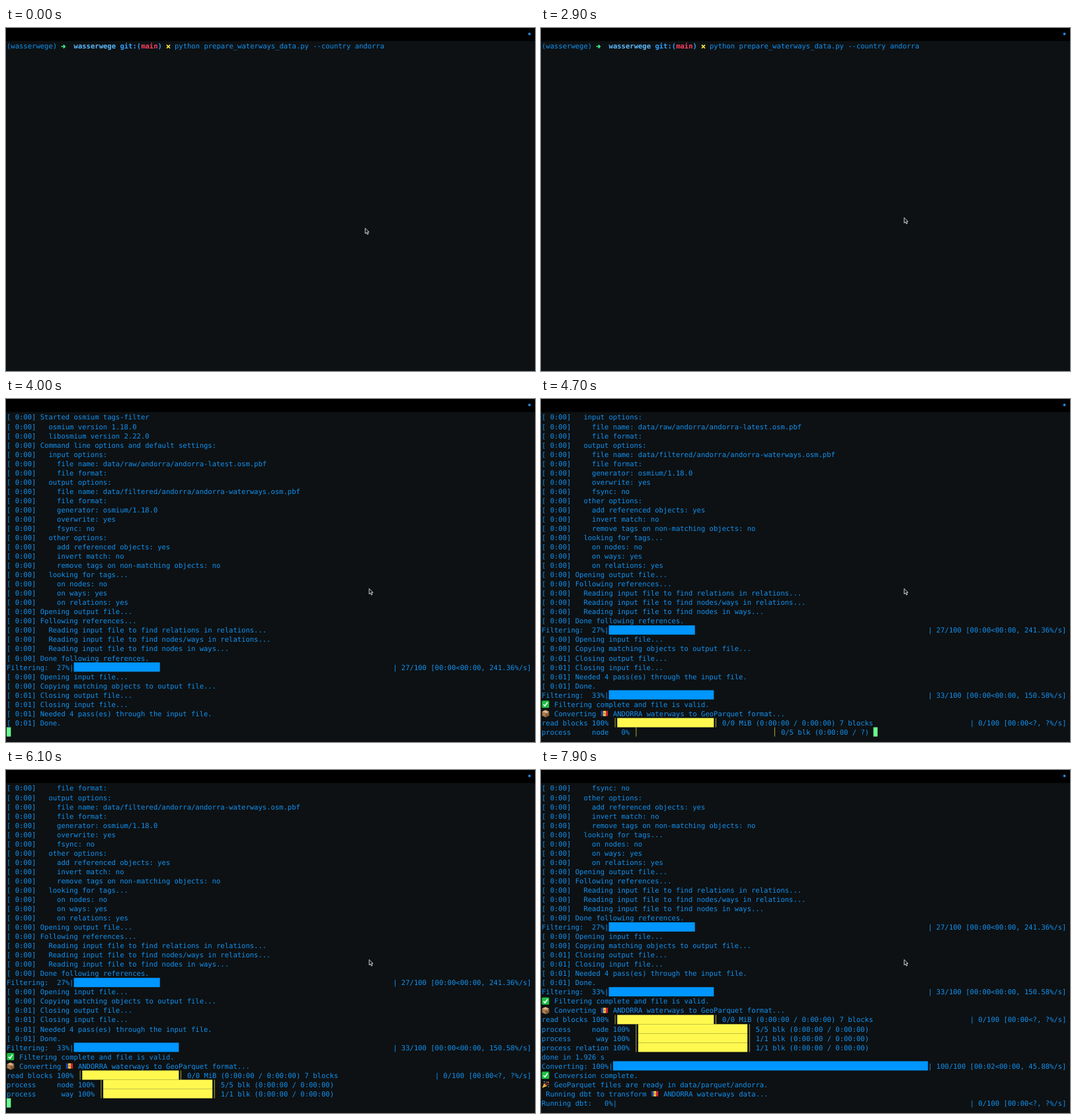
An HTML page for the animation above (8 s loop, 800 by 520 pixels).

```html
<!DOCTYPE html>
<html lang="en">
<head>
<meta charset="utf-8">
<title>Terminal session</title>
<style>
  html, body { margin: 0; width: 100%; height: 100%; overflow: hidden; background: #0d1113; }
  svg { display: block; }
  text {
    font: 10.548px "DejaVu Sans Mono", "Noto Sans Mono", monospace;
    fill: #1291f0;
    white-space: pre;
    text-rendering: geometricPrecision;
    font-variant-ligatures: none;
  }
  .bold { font-weight: 700; }
</style>
</head>
<body>
<svg width="800" height="520" viewBox="0 0 800 520">
  <defs>
    <g id="check">
      <rect x=".3" y="1.6" width="11" height="11" rx="1.5" fill="#1fbf45"/>
      <path d="M2.8 7.4 5 9.8 8.9 4.2" fill="none" stroke="#fff" stroke-width="1.6"/>
    </g>
    <g id="box">
      <path d="M.6 4.4 6 2l5.2 2.4v6L6 13 .6 10.4z" fill="#a97a4e"/>
      <path d="M.6 4.4 6 2l5.2 2.4L6 6.8z" fill="#d0a273"/>
      <path d="M6 6.8V13l5.2-2.6v-6z" fill="#855a35"/>
      <path d="M3 3.4 8.6 5.8v2" fill="none" stroke="#e6cfae"/>
    </g>
    <g id="flag">
      <path d="M.8 3.2h3.6v8H.8z" fill="#2143a8"/>
      <path d="M4.2 3.2h4v8h-4z" fill="#f7d32f"/>
      <path d="M8 3.2h3.2v8H8z" fill="#d32339"/>
      <path d="M5.2 5.8h2v2.8h-2z" fill="#b9805a"/>
    </g>
    <g id="party">
      <path d="M.8 12.4 3.6 5.4 7.8 9.6z" fill="#f0b93a"/>
      <path d="M3.6 5.4 7.8 9.6" stroke="#b5722a" stroke-width="1.4"/>
      <path d="M6 6.4q2-1 1-4M7.4 8q2-2 4-1" fill="none" stroke="#e8508a"/>
      <circle cx="4" cy="3" r=".9" fill="#4fb6f2"/>
      <circle cx="9.8" cy="3.8" r=".9" fill="#f2d24f"/>
      <circle cx="10.2" cy="10.4" r=".8" fill="#58c86a"/>
    </g>
  </defs>
  <rect width="800" height="520" fill="#0d1113"/>
  <g id="screen"></g>
  <rect width="800" height="19.7"/>
  <circle cx="791.6" cy="9" r="2" fill="#1c86dc"/>
  <path id="mouse" d="M0 0v8.2l1.9-1.7 1.4 3 1.5-.7-1.4-2.9h2.5z" fill="#101010" stroke="#e4e4e4" stroke-width=".9"/>
</svg>
<script>
const LOOP = 8000, ROWS = 35, CELL = 6.35, PITCH = 14.04, LEFT = 1, TOP = 20.3;
const BLUE = '#0096ff', YELLOW = '#fff94f', RULE = '#aaa63f';
const screen = document.getElementById('screen');
const mouse = document.getElementById('mouse');
const lines = [];

function add(parent, tag, attrs, content) {
  const el = document.createElementNS('http://www.w3.org/2000/svg', tag);
  for (const key in attrs) el.setAttribute(key, attrs[key]);
  if (content) el.textContent = content;
  return parent.appendChild(el);
}

const xOf = col => LEFT + col * CELL;

// Parts of a line, each placed at a text column
const text = (col, str, fill, bold) => g => {
  const el = add(g, 'text', { x: xOf(col), y: 11.2, class: bold ? 'bold' : '' }, str);
  if (fill) el.style.fill = fill;
};
const bar = (col, cols, fill) => g =>
  add(g, 'rect', { x: xOf(col), width: cols * CELL, height: PITCH, fill });
const rule = col => g =>
  add(g, 'rect', { x: xOf(col + .5) - .5, width: 1, height: PITCH, fill: RULE });
const icon = (col, id) => g => add(g, 'use', { href: '#' + id, x: xOf(col) });
const stroke = (d, color, width) => g =>
  add(g, 'path', { d, stroke: color, 'stroke-width': width, fill: 'none' });

function line(row, from, to, ...parts) {
  const g = add(screen, 'g', {});
  parts.forEach(part => part(g));
  lines.push({ g, row, from, to });
}

const percent = (label, value, col) => label + (value + '%|').padStart(col - label.length);
const tqdm = (label, value, start, cols, tail) => [
  text(0, percent(label, value, start)),
  bar(start, cols, BLUE),
  text(125 - tail.length, tail)
];
const waiting = '| 0/100 [00:00<?, ?%/s]';
const gauge = (label, value, start, cols, filled, tail) => [
  text(0, label + (value + '%').padStart(start - 2 - label.length)),
  rule(start - 1),
  bar(start, filled, YELLOW),
  rule(start + cols),
  text(start + cols + 2, tail)
];
const stage = (name, tail) =>
  gauge('process ' + name.padStart(8), 100, 23, 26, 26, tail + ' blk (0:00:00 / 0:00:00)');

line(0, 0, LOOP,
  text(0, '(wasserwege)'),
  stroke('M83.6 7.8H88.4M86.8 5.3 89.3 7.8 86.8 10.3', '#3df58a', 1.5),
  text(16, 'wasserwege', '#5cbcff', true),
  text(27, 'git:(', '#2fa0ff', true),
  text(32, 'main', '#ff3f5f', true),
  text(36, ')', '#2fa0ff', true),
  stroke('M243 5.3 248 10.5M248 5.3 243 10.5', '#fff04a', 1.6),
  text(40, 'python prepare_waterways_data.py --country andorra'));

const log = `Started osmium tags-filter
  osmium version 1.18.0
  libosmium version 2.22.0
Command line options and default settings:
  input options:
    file name: data/raw/andorra/andorra-latest.osm.pbf
    file format:
  output options:
    file name: data/filtered/andorra/andorra-waterways.osm.pbf
    file format:
    generator: osmium/1.18.0
    overwrite: yes
    fsync: no
  other options:
    add referenced objects: yes
    invert match: no
    remove tags on non-matching objects: no
  looking for tags...
    on nodes: no
    on ways: yes
    on relations: yes
Opening output file...
Following references...
  Reading input file to find relations in relations...
  Reading input file to find nodes/ways in relations...
  Reading input file to find nodes in ways...
Done following references.
@
Opening input file...
Copying matching objects to output file...
Closing output file...
Closing input file...
Needed 4 pass(es) through the input file.
Done.`.split('\n');

log.forEach((entry, i) => {
  const parts = entry === '@'
    ? tqdm('Filtering:', 27, 16, 20.5, '| 27/100 [00:00<00:00, 241.36%/s]')
    : [text(0, `[ 0:0${i < 30 ? 0 : 1}] ${entry}`)];
  line(i + 1, 3900, LOOP, ...parts);
});

line(35, 4100, LOOP, ...tqdm('Filtering:', 33, 16, 25, '| 33/100 [00:00<00:00, 150.58%/s]'));
line(36, 4100, LOOP, icon(0, 'check'), text(3, 'Filtering complete and file is valid.'));
line(37, 4100, LOOP, icon(0, 'box'), text(3, 'Converting'), icon(14, 'flag'),
  text(17, 'ANDORRA waterways to GeoParquet format...'));
line(38, 4400, 4600, ...tqdm('Converting:', 0, 17, 0, waiting));
line(38, 4600, LOOP,
  ...gauge('read blocks', 100, 18, 23, 23, '0/0 MiB (0:00:00 / 0:00:00) 7 blocks'),
  text(102, waiting));
line(39, 4600, 5900, ...gauge('process     node', 0, 23, 32, 0, '0/5 blk (0:00:00 / ?)'));
line(39, 5900, LOOP, ...stage('node', '5/5'));
line(40, 6000, LOOP, ...stage('way', '1/1'));
line(41, 6300, LOOP, ...stage('relation', '1/1'));
line(42, 6300, LOOP, text(0, 'done in 1.926 s'));
line(43, 6600, LOOP, ...tqdm('Converting:', 100, 17, 75, '| 100/100 [00:02<00:00, 45.88%/s]'));
line(44, 6600, LOOP, icon(0, 'check'), text(3, 'Conversion complete.'));
line(45, 6600, LOOP, icon(0, 'party'), text(3, 'GeoParquet files are ready in data/parquet/andorra.'));
line(46, 6600, LOOP, text(1, 'Running dbt to transform'), icon(26, 'flag'),
  text(29, 'ANDORRA waterways data...'));
line(47, 6600, LOOP, ...tqdm('Running dbt:', 0, 18, 0, waiting));

const caret = add(screen, 'rect', { width: CELL, height: PITCH, fill: '#69ff8e' });

// Time, line count and caret column (-1: caret past the right edge)
const steps = [
  [0, 1, -1], [600, 2, 0], [3900, 36, 0], [4100, 39, 0], [4400, 39, -1],
  [4600, 40, 79], [5900, 41, 0], [6000, 42, 0], [6300, 44, 0], [6600, 48, -1]
];

function draw(t) {
  const [start, count, col] = steps.filter(s => s[0] <= t).pop();
  const first = Math.max(0, count - ROWS);
  const yOf = row => TOP + (row - first) * PITCH;

  for (const { g, row, from, to } of lines) {
    const shown = t >= from && t < to && row >= first;
    g.style.display = shown ? '' : 'none';
    if (shown) g.setAttribute('transform', `translate(0 ${yOf(row)})`);
  }

  const lit = col >= 0 && Math.floor((t - start) / 600) % 2 === 0;
  caret.style.display = lit ? '' : 'none';
  caret.setAttribute('x', xOf(Math.max(col, 0)));
  caret.setAttribute('y', yOf(count - 1));

  const move = Math.min(2, Math.floor(t / 100)) / 2;
  mouse.setAttribute('transform', `translate(${543.2 + 6 * move} ${303.5 - 16 * move})`);
}

const origin = performance.now();
function tick() {
  draw((performance.now() - origin) % LOOP);
  requestAnimationFrame(tick);
}
tick();
</script>
</body>
</html>
```
